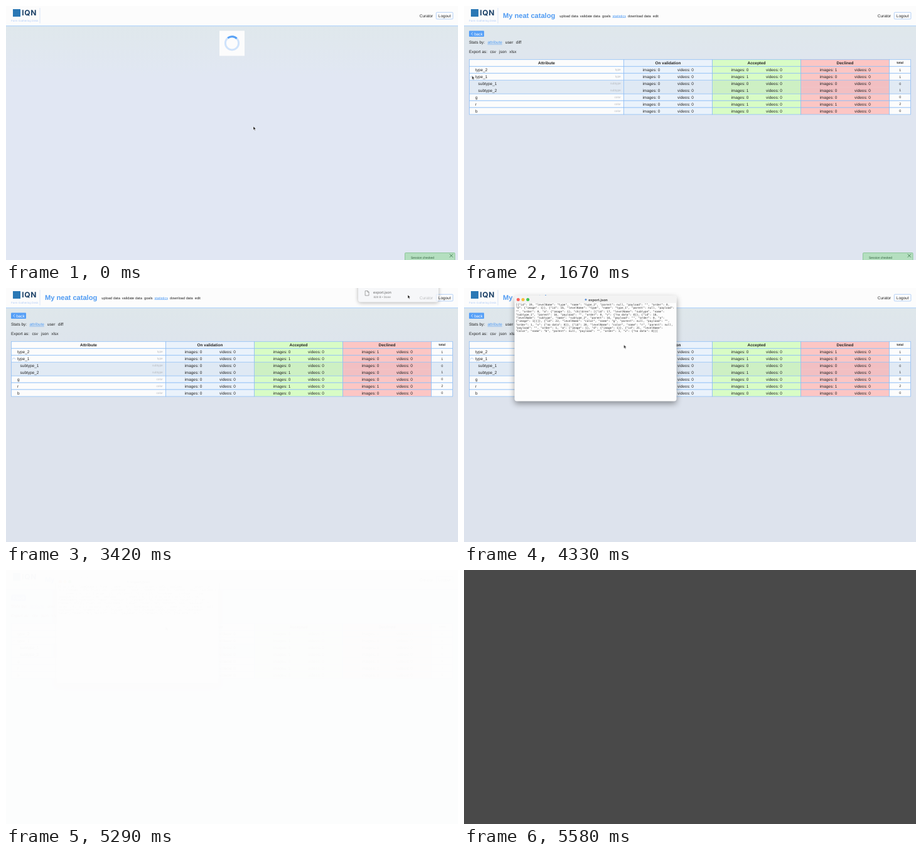
Write an HTML page that moves like this. It is 720 px wide and 405 px high and loops after 5.62 s.

```html
<!DOCTYPE html>
<html lang="en">
<head>
<meta charset="utf-8">
<title>Statistics export</title>
<style>
  html, body { margin: 0; width: 100%; height: 100%; overflow: hidden; background: #e1e7f2; }
  svg { display: block; width: 100vw; height: 100vh; }
  text { font: 6.45px "Liberation Sans", Arial, sans-serif; fill: #222; text-rendering: geometricPrecision; white-space: pre; }
  .nav { font-size: 5.65px; }
  .title { font-size: 11.1px; font-weight: bold; fill: #509bf2; }
  .brand { font: bold 12px Inter, sans-serif; fill: #1d4268; letter-spacing: .6px; }
  .tag { font-size: 4.55px; fill: #b3cdf7; }
  .head { font-weight: bold; text-anchor: middle; }
  .small { font-size: 5px; }
  .sum { font-size: 5.3px; text-anchor: middle; }
  .kind { font-size: 4.8px; fill: #b4b8be; text-anchor: end; }
  .link { fill: #4d9af4; }
  .white { fill: #fff; }
  .file { font-size: 5.9px; fill: #333; }
  .meta { font-size: 4.65px; fill: #555; }
  .note { font-size: 4.9px; fill: #2c5b38; }
  .bar { font-size: 5.7px; font-weight: bold; fill: #444; }
  .mono { font: 4.39px "DejaVu Sans Mono", monospace; fill: #333; }
  .line { fill: none; stroke-linecap: round; stroke-linejoin: round; }

  /* one shared loop for every moving part */
  .bg, .loading, .page, .closed, .open, .rest, .json, .toast, .icon, .popup, .window, .cursor, .fade {
    animation: 5620ms linear infinite both;
  }
  .loading, .page, .closed, .open, .rest, .json { animation-timing-function: step-end; }

  .bg { animation-name: bg; }
  @keyframes bg { 0%, 15% { fill: #e1e7f3 } 45%, 100% { fill: #dde3ed } }

  .loading, .closed { animation-name: hide; }
  .loading { --off: 0; }
  .loading { animation-name: loading; }
  @keyframes loading { 0% { opacity: 1 } 5.87%, 100% { opacity: 0 } }
  .page { animation-name: page; }
  @keyframes page { 0% { opacity: 0 } 5.87%, 100% { opacity: 1 } }

  .closed { animation-name: closed; }
  @keyframes closed { 0% { opacity: 1 } 25.6%, 100% { opacity: 0 } }
  .open { animation-name: open; }
  @keyframes open { 0% { opacity: 0 } 25.6%, 100% { opacity: 1 } }
  .rest { animation-name: rest; }
  @keyframes rest { 0% { transform: translateY(0) } 25.6%, 100% { transform: translateY(21.9px) } }

  .json { animation-name: json; }
  @keyframes json { 0% { fill: #222 } 40.9% { fill: #4d9af4 } 52.4%, 100% { fill: #222 } }

  .toast { animation-name: toast; }
  @keyframes toast { 0%, 46.26% { opacity: 1 } 51.6%, 100% { opacity: 0 } }
  .icon { animation-name: icon; }
  @keyframes icon { 0%, 47% { opacity: 0 } 48.6%, 50% { opacity: .9 } 52.1%, 100% { opacity: 0 } }
  .popup { animation-name: popup; }
  @keyframes popup {
    0%, 46.26% { opacity: 0; transform: translateY(-6px) }
    48.4%, 60.5% { opacity: 1; transform: none }
    61.9%, 100% { opacity: 0; transform: none }
  }
  .window { animation-name: window; transform-box: fill-box; transform-origin: center; filter: drop-shadow(0 4px 5px rgba(0, 0, 0, .38)); }
  @keyframes window {
    0%, 72.8% { opacity: 0; transform: scale(.75); animation-timing-function: ease-out }
    75.8%, 100% { opacity: 1; transform: none }
  }

  .cursor { animation-name: cursor; animation-timing-function: ease-in-out; }
  @keyframes cursor {
    0%, 2.67% { transform: translate(394px, 192px) }
    14.77% { transform: translate(196.5px, 136.5px) }
    23.13%, 29.18% { transform: translate(12.5px, 111.5px) }
    41.81%, 51.6% { transform: translate(65.5px, 72.8px) }
    60%, 64.06% { transform: translate(640px, 11px) }
    74.73%, 100% { transform: translate(254.6px, 90.6px) }
  }

  .fade { animation-name: fade; }
  @keyframes fade {
    0%, 80.78% { opacity: 0; fill: #fdfdfd }
    88.25%, 94.2% { opacity: .985; fill: #fdfdfd }
    94.27% { opacity: 1; fill: #fcfcfc }
    100% { opacity: 1; fill: #303030 }
  }
</style>
</head>
<body>
<svg id="stage" viewBox="0 0 720 405" preserveAspectRatio="none">
  <defs>
    <linearGradient id="tint" x2="0" y2="1">
      <stop stop-color="#dfe8ea" stop-opacity=".8"/>
      <stop offset="1" stop-color="#dfe8ea" stop-opacity="0"/>
    </linearGradient>
  </defs>
  <rect class="bg" width="720" height="405"/>
  <rect y="32" width="720" height="80" fill="url(#tint)"/>

  <rect width="720" height="31" fill="#fcfcfc"/>
  <rect y="31" width="720" height="1.4" fill="#b9d7fa"/>
  <rect x="11" y="5" width="12" height="12" fill="#2b78b5"/>
  <text class="brand" x="25.3" y="15.3">IQN</text>
  <text class="tag" x="8" y="25.3">Form Gathering Desk</text>
  <path d="M54 3V27.5" stroke="#cfdff8" stroke-width=".8"/>
  <text x="658.8" y="17.8">Curator</text>
  <rect x="685.3" y="10.2" width="26.6" height="10.6" rx="1" fill="#fff" stroke="#9fc3f5" stroke-width=".8"/>
  <text x="688.8" y="17.8">Logout</text>

  <g class="loading">
    <rect x="340" y="39.5" width="40" height="40" fill="#fcfcfc"/>
    <circle cx="360" cy="59.3" r="10.6" fill="none" stroke="#cfe3fb" stroke-width="3"/>
    <path d="M353.2 51.2A10.6 10.6 0 0 1 367.5 51.8" fill="none" stroke="#58a1f5" stroke-width="3">
      <animateTransform attributeName="transform" type="rotate" from="0 360 59.3" to="360 360 59.3" dur="1s" repeatCount="indefinite"/>
    </path>
  </g>

  <g class="page">
    <text class="title" x="62" y="19">My neat catalog</text>
    <g id="nav"></g>
    <rect x="8" y="39.6" width="24" height="9.4" rx="1" fill="#559ff7"/>
    <path class="line" d="M13.6 42.2 11.8 44.3 13.6 46.4" stroke="#fff" stroke-width=".7"/>
    <text class="white" x="16.2" y="46.6">back</text>
    <g id="filters"></g>
    <g id="table"></g>
    <path class="line closed" d="M10.3 111 12.6 113.2 14.9 111" stroke="#667" stroke-width=".7"/>
    <path class="line open" d="M10.3 113.4 12.6 111.4 14.9 113.4" stroke="#8bb5ea" stroke-width=".7"/>
  </g>

  <g class="toast">
    <rect x="635.5" y="393.6" width="79.5" height="20" rx="1" fill="#b4dfbf" stroke="#86c294" stroke-width=".9"/>
    <text class="note" x="645" y="403.2">Session checked</text>
    <path class="line" d="M707 395.8 711.6 400.4M711.6 395.8 707 400.4" stroke="#3f7a4d" stroke-width=".9"/>
  </g>

  <g class="icon">
    <circle cy="8" r="11" fill="#f5f8fd"/>
    <path class="line" d="M1 0V9M-2.5 6 1 9.5 4.5 6M-3 11.5H4.8V8.6" stroke="#2f6fc4" stroke-width="1.3"/>
  </g>

  <g class="popup" style="filter:drop-shadow(0 1.5px 3px rgba(0,0,0,.4))">
    <rect x="561" y="-12" width="128" height="34.5" rx="4" fill="#f4f6f9"/>
    <path class="line" d="M572.5 4.6H576L578 6.6V12H572.5ZM576 4.6V6.6H578" stroke="#555" stroke-width=".7"/>
    <text class="file" x="585" y="9.2">export.json</text>
    <text class="meta" x="585.4" y="15.7">828 B • Done</text>
  </g>

  <g class="window" id="window">
    <rect x="80.5" y="12" width="258" height="168.5" rx="4" fill="#fdfdfd"/>
    <path d="M80.5 24V16a4 4 0 0 1 4-4H334.500a4 4 0 0 1 4 4V24Z" fill="#f3f3f3"/>
    <circle cx="86.3" cy="18.6" r="2.5" fill="#fb615a"/>
    <circle cx="94" cy="18.6" r="2.5" fill="#f8bd3b"/>
    <circle cx="101.7" cy="18.6" r="2.5" fill="#42c553"/>
    <circle cx="194" cy="18.4" r="1.5" fill="#5d8fd6"/>
    <text class="bar" x="198.200" y="20.5">export.json</text>
  </g>

  <g class="cursor">
    <path d="M0 0V5.6L1.3 4.4 2.200 6.500 3.200 6.100 2.300 4H4.100Z" fill="#111" stroke="#fff" stroke-width=".5"/>
  </g>
  <rect class="fade" width="720" height="405"/>
</svg>
<script>
  const byId = id => document.getElementById(id);

  function add(parent, tag, attrs, content = '') {
    const el = document.createElementNS('http://www.w3.org/2000/svg', tag);
    for (const key in attrs) el.setAttribute(key, attrs[key]);
    el.textContent = content;
    return parent.appendChild(el);
  }
  const text = (parent, x, y, content, cls = '') => add(parent, 'text', { x, y, class: cls }, content);

  function link(parent, x, y, width, content, cls = '') {
    text(parent, x, y, content, 'link ' + cls);
    add(parent, 'rect', { x, y: y + .7, width, height: .5, fill: '#4d9af4' });
  }

  // header and filter links
  const nav = byId('nav'), filters = byId('filters');
  [[152.3, 'upload data'], [184.8, 'validate data'], [220, 'goals'], [261, 'download data'], [300.8, 'edit']]
    .forEach(([x, label]) => text(nav, x, 17.6, label, 'nav'));
  link(nav, 236.4, 17.6, 21.3, 'statistics', 'nav');
  [[8, 'Stats by:'], [65.8, 'user'], [82.8, 'diff']].forEach(([x, label]) => text(filters, x, 60.2, label));
  link(filters, 37.5, 60.2, 23.2, 'attribute');
  [[8, 'Export as:'], [41.4, 'csv'], [72.3, 'xlsx']].forEach(([x, label]) => text(filters, x, 75.3, label));
  text(filters, 56, 75.3, 'json', 'json');

  // statistics table
  const edges = [8.4, 254.5, 395.5, 536.5, 677.5, 711.6];
  const plain = ['#fcfcfc', '#eaf2fb', '#d8fcc5', '#fcc6c4', '#fcfcfc'];
  const nested = ['#e1eaf4', '#dfe9f4', '#cdf0c3', '#f2bfc2', '#e1eaf4'];
  const top0 = 85.3, rowTop = 96.3, rowHeight = 10.95;

  function cells(parent, y, height, fills, stroke) {
    fills.forEach((fill, i) => add(parent, 'rect', {
      x: edges[i], y, width: edges[i + 1] - edges[i], height, fill, stroke, 'stroke-width': .8
    }));
  }

  function row(parent, index, name, kind, accepted, declined, sub) {
    const y = rowTop + index * rowHeight, base = y + 7.7;
    cells(parent, y, rowHeight, sub ? nested : plain, sub ? 'none' : '#8fbff5');
    text(parent, sub ? 22.6 : 18, base, name);
    text(parent, 249.8, base - .9, kind, 'kind');
    [0, accepted, declined].forEach((count, i) => {
      text(parent, 284.4 + i * 141, base, 'images: ' + count);
      text(parent, 340 + i * 141, base, 'videos: 0');
    });
    text(parent, 694.8, base - .4, accepted + declined, 'sum');
  }

  const table = byId('table');
  cells(table, top0, 11, plain, '#8fbff5');
  ['Attribute', 'On validation', 'Accepted', 'Declined', 'total'].forEach((label, i) =>
    text(table, (edges[i] + edges[i + 1]) / 2, i < 4 ? 92.9 : 92.2, label, i < 4 ? 'head' : 'head small'));

  const open = add(table, 'g', { class: 'open' });
  row(open, 2, 'subtype_1', 'subtype', 0, 0, true);
  row(open, 3, 'subtype_2', 'subtype', 1, 0, true);
  edges.forEach(x => add(open, 'rect', { x: x - .4, y: rowTop + 2 * rowHeight, width: .8, height: 2 * rowHeight, fill: '#8fbff5' }));
  row(table, 0, 'type_2', 'type', 0, 1);
  row(table, 1, 'type_1', 'type', 1, 0);
  const rest = add(table, 'g', { class: 'rest' });
  row(rest, 2, 'g', 'color', 0, 0);
  row(rest, 3, 'r', 'color', 1, 1);
  row(rest, 4, 'b', 'color', 0, 0);

  // exported file
  `[{"id": 19, "levelName": "type", "name": "type_2", "parent": null, "payload": "", "order": 0,
"d": {"image": 1}}, {"id": 16, "levelName": "type", "name": "type_1", "parent": null, "payload":
"", "order": 0, "a": {"image": 1}, "children": [{"id": 17, "levelName": "subtype", "name":
"subtype_1", "parent": 16, "payload": "", "order": 0, "v": {"no data": 0}}, {"id": 18,
"levelName": "subtype", "name": "subtype_2", "parent": 16, "payload": "", "order": 0, "a":
{"image": 1}}]}, {"id": 22, "levelName": "color", "name": "g", "parent": null, "payload": "",
"order": 1, "v": {"no data": 0}}, {"id": 20, "levelName": "color", "name": "r", "parent": null,
"payload": "", "order": 1, "a": {"image": 1}, "d": {"image": 1}}, {"id": 21, "levelName":
"color", "name": "b", "parent": null, "payload": "", "order": 1, "v": {"no data": 0}}]`
    .split('\n').forEach((line, i) => text(byId('window'), 82.4, 28.2 + i * 5.22, line, 'mono'));
</script>
</body>
</html>
```
